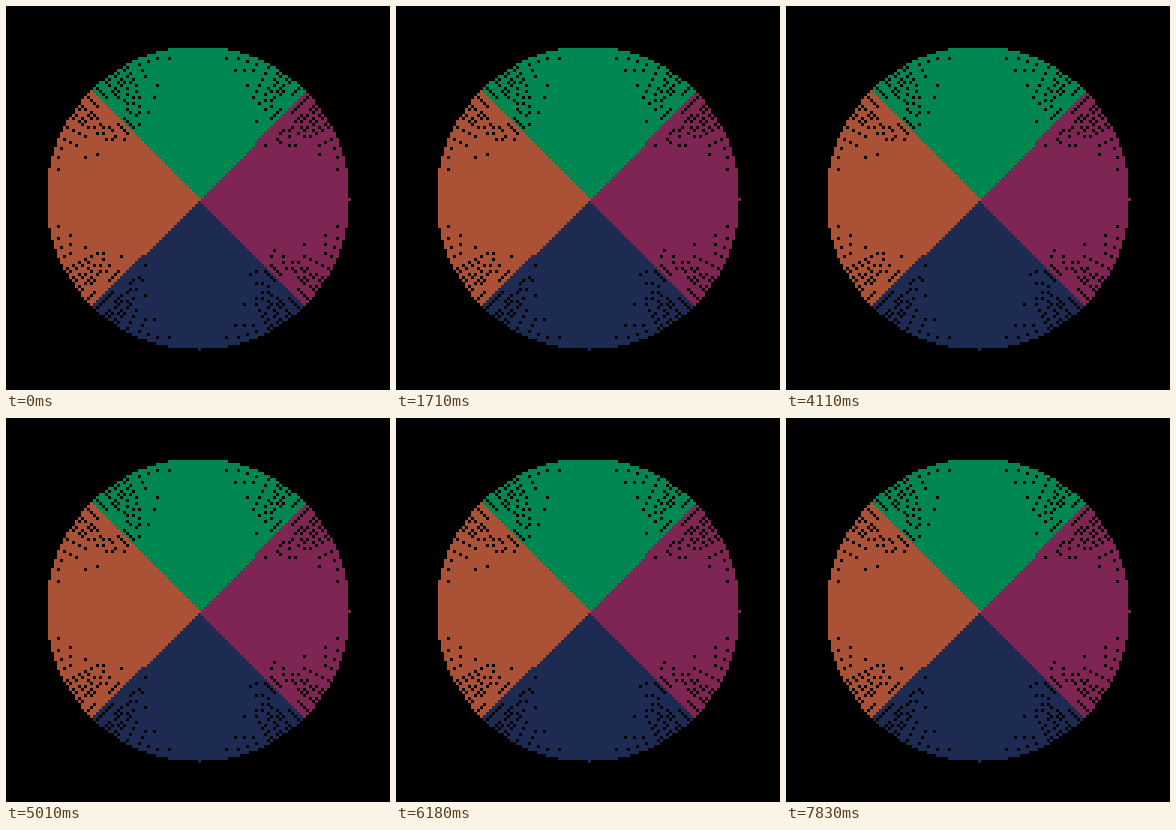
An HTML page with a canvas for the animation above (8000 ms loop, 384 by 384 pixels).

```html
<!DOCTYPE html>
<html lang="en">
<head>
<meta charset="utf-8">
<title>Four-colour wheel</title>
<style>
  html, body { margin: 0; width: 100%; height: 100%; overflow: hidden; background: #000; }
  canvas { display: block; width: 384px; height: 384px; image-rendering: pixelated; }
</style>
</head>
<body>
<canvas id="stage" width="128" height="128"></canvas>
<script>
const LOOP = 8000;
const CENTER = 64;
const RADIUS = 50;
const LIT_GREEN = '#00e436';

// Wedges in drawing order; later ones cover the shared edges.
const wedges = [
  { start: 225, color: '#1d2b53' },
  { start: 315, color: '#7e2553' },
  { start: 45, color: '#008751', lit: LIT_GREEN },
  { start: 135, color: '#ab5236' }
];

// Times at which the green wedge is lit: [on, off]
const flashes = [
  [1260, 1710], [2280, 2550], [3660, 4110], [4560, 5010],
  [5550, 5820], [6000, 6180], [7380, 7830]
];

const ctx = document.getElementById('stage').getContext('2d');

// 16.16 fixed-point rounding
const truncate = v => Math.floor(v * 65536) / 65536;
const nearest = v => Math.round(v * 65536) / 65536;

// Whole-pixel line from the center, stepping along its longer axis
function ray(dx, dy) {
  const steps = Math.max(Math.abs(dx), Math.abs(dy));
  for (let i = 0; i <= steps; i++) {
    const x = Math.round(CENTER + dx * i / steps);
    const y = Math.round(CENTER + dy * i / steps);
    ctx.fillRect(x, y, 1, 1);
  }
}

// One ray per degree leaves the gaps near the diagonals
function drawWedge(start, color) {
  ctx.fillStyle = color;
  for (let deg = start; deg <= start + 90; deg++) {
    const angle = truncate(deg / 360) * 2 * Math.PI;
    ray(Math.floor(RADIUS * nearest(Math.cos(angle))),
        Math.floor(-RADIUS * nearest(Math.sin(angle))));
  }
}

function draw(isLit) {
  ctx.fillStyle = '#000';
  ctx.fillRect(0, 0, 128, 128);
  for (const { start, color, lit } of wedges) {
    drawWedge(start, isLit && lit ? lit : color);
  }
}

let shown = null;
function update() {
  const t = performance.now() % LOOP;
  const isLit = flashes.some(([on, off]) => t >= on && t < off);
  if (isLit !== shown) draw(shown = isLit);
  requestAnimationFrame(update);
}
update();
</script>
</body>
</html>
```
